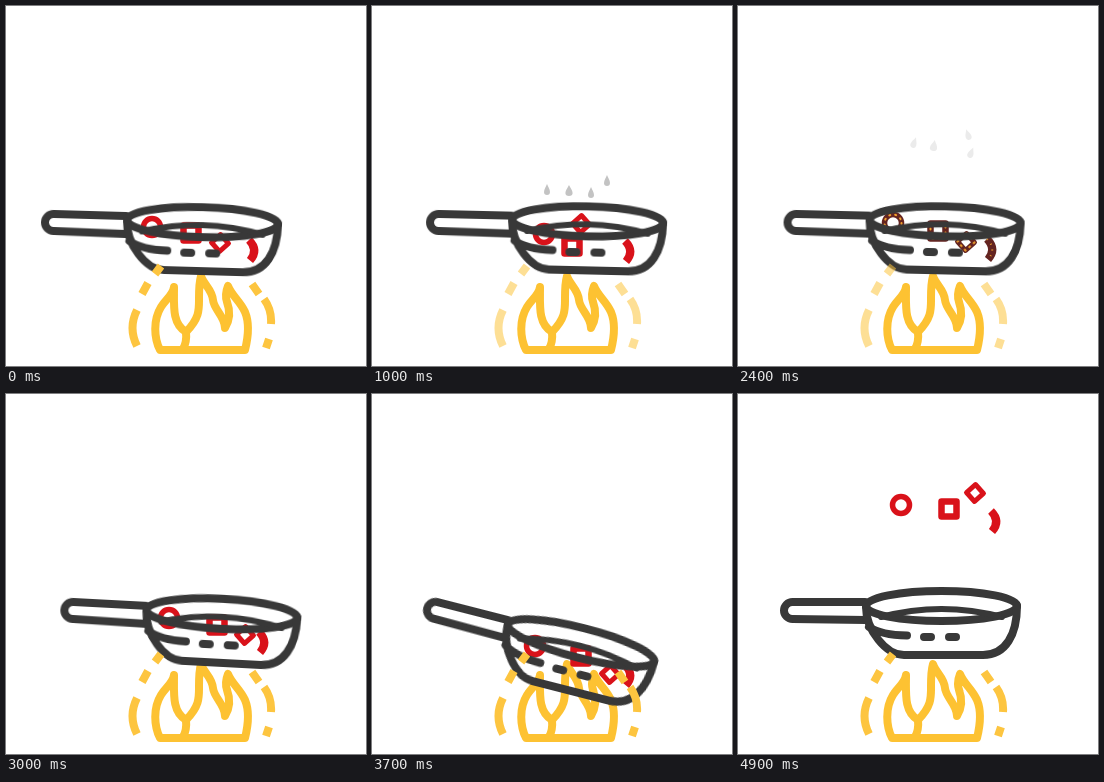
Animation, 360 px wide and 360 px high, one loop 5 s. Source, as an HTML page without scripts:

```html
<!DOCTYPE html>
<html lang="en">
<head>
<meta charset="utf-8">
<title>Frying pan</title>
<style>
html, body { margin: 0; width: 100%; height: 100%; overflow: hidden; background: #fff; }
svg { display: block; width: 100%; height: 100%; fill: none; stroke-linecap: round; stroke-linejoin: round; }

.fire { stroke: #fdc232; stroke-width: 8; }
.glow { stroke: #fdc540; stroke-width: 8; stroke-linecap: butt; animation: glow 5s linear infinite; }
.pan {
  stroke: #383838; stroke-width: 8; transform-origin: 55px 216.5px;
  animation: slide 5s ease-in-out infinite, tilt 5s cubic-bezier(.37, 0, .63, 1) infinite;
}
.food > g { stroke: #d9121a; animation: toss 5s ease-in-out infinite, sear 5s linear infinite; }
.char { stroke: #f2a02c; stroke-width: 2; stroke-dasharray: 1 5; animation: char 5s linear infinite; }
.steam { fill: #bdbdbd; animation: fade 5s linear infinite; }
.steam use { animation: rise 5s linear infinite; }

@keyframes glow { 0%, 60%, 100% { opacity: 1; } 16%, 50% { opacity: .55; } }
@keyframes slide {
  0%, 37% { translate: -7px 0; }
  18%, 58% { translate: 12.5px 0; }
  74% { translate: 9px 0; animation-timing-function: linear; }
  86% { translate: 6px 0; animation-timing-function: linear; }
  98%, 100% { translate: 0 0; }
}
@keyframes tilt {
  0% { rotate: 1.6deg; }
  20%, 56% { rotate: 1.3deg; }
  73% { rotate: 14.6deg; }
  87% { rotate: -6.2deg; }
  98%, 100% { rotate: 0deg; }
}
@keyframes toss {
  0%, 37% { translate: var(--rest); }
  20% { translate: var(--hop); }
  48% { translate: var(--back); }
  60% { translate: var(--front); }
  74% { translate: var(--dip); }
  84% { translate: var(--lift); animation-timing-function: linear; }
  86% { translate: var(--fly); animation-timing-function: cubic-bezier(.3, .4, .6, 1); }
  93.6% { translate: var(--top); animation-timing-function: ease-in; }
  98%, 100% { translate: var(--fall); }
}
@keyframes sear { 0%, 42%, 54%, 100% { stroke: #d9121a; } 47%, 49% { stroke: #642420; } }
@keyframes char { 0%, 43%, 53%, 100% { opacity: 0; } 47%, 49% { opacity: 1; } }
@keyframes fade { 0%, 5% { opacity: 0; } 13% { opacity: 1; } 20% { opacity: .9; } 48% { opacity: .3; } 54%, 100% { opacity: 0; } }
@keyframes rise {
  0% { translate: 0 33px; rotate: 0deg; }
  20% { translate: 0 0; rotate: 0deg; }
  48% { translate: var(--drift); rotate: var(--lean); }
  54%, 100% { translate: var(--drift); rotate: var(--lean); }
}

.ring {
  --rest: 146px 221px; --hop: 172px 228px; --back: 155px 217px; --front: 163px 224px; --dip: 163px 252px;
  --lift: 163px 196px; --fly: 163px 174px; --top: 163px 101px; --fall: 163px 111px;
}
.cube {
  --rest: 185px 227px; --hop: 200px 240px; --back: 200px 225px; --front: 211px 231px; --dip: 209px 262px;
  --lift: 211px 204px; --fly: 211px 181px; --top: 211px 105px; --fall: 211px 115px;
}
.gem {
  --rest: 214px 237px; --hop: 209px 218px; --back: 228px 236px; --front: 239px 241px; --dip: 238px 280px;
  --lift: 237px 205px; --fly: 237px 179px; --top: 237px 88px; --fall: 237px 99px;
}
.slice {
  --rest: 247px 244px; --hop: 257px 245px; --back: 253px 243px; --front: 257px 248px; --dip: 257px 281px;
  --lift: 257px 218px; --fly: 257px 196px; --top: 257px 117px; --fall: 257px 127px;
}
</style>
</head>
<body>
<svg viewBox="0 0 360 360">
  <defs>
    <path id="drop" d="M0-6C1-3 3-1 3 2A3 3 0 0 1-3 2C-3-1-1-3 0-6Z"/>
    <circle id="ring" r="8.5"/>
    <rect id="cube" x="-7.5" y="-7.5" width="15" height="15"/>
    <rect id="gem" x="-6" y="-6" width="12" height="12" transform="rotate(48)"/>
    <path id="slice" d="M-4-10Q6 0-3 10.5"/>
  </defs>

  <g class="steam">
    <g transform="translate(175 184)"><use href="#drop" style="--drift: 1px -47px; --lean: 20deg"/></g>
    <g transform="translate(197 185) scale(1.2 1)"><use href="#drop" style="--drift: -1px -45px; --lean: 8deg"/></g>
    <g transform="translate(219 187)"><use href="#drop" style="--drift: 14px -40px; --lean: 22deg"/></g>
    <g transform="translate(235 175)"><use href="#drop" style="--drift: -5px -46px; --lean: -18deg"/></g>
  </g>

  <g class="fire">
    <path d="M154 344C148 332 147 314 155 301C160 293 167 289 168 281C168 300 166 318 180 326C194 312 193 303 193 292C193 284 193 277 195 270C198 279 206 283 207 294C208 304 219 310 219 322C225 312 224 304 221 296C219 290 220 285 222 280C226 290 234 295 239 306C244 318 242 332 239 344Z"/>
    <path d="M180 326Q181 336 177 343"/>
  </g>

  <g class="food">
    <g class="ring" stroke-width="5.5"><use href="#ring"/><use class="char" href="#ring"/></g>
    <g class="cube" stroke-width="6.5"><use href="#cube"/><use class="char" href="#cube"/></g>
    <g class="gem" stroke-width="5"><use href="#gem"/><use class="char" href="#gem"/></g>
    <g class="slice" stroke-width="8" stroke-linecap="butt"><use href="#slice"/><use class="char" href="#slice"/></g>
  </g>

  <g class="pan">
    <path d="M127 208H54.5A8.5 8.5 0 0 0 54.5 225L128 226"/>
    <ellipse cx="203.500" cy="212" rx="75.500" ry="15"/>
    <path d="M128 213C128 236 148 261 166 261H245C268 261 279 240 279 212"/>
    <path d="M143 223Q203.500 207 264 223" stroke-width="6"/>
    <path d="M131 233Q143 241 169 241.500M186 243H193M211 243H218"/>
  </g>

  <path class="glow" d="M131 340Q122 322 131 304M136 288L142 277M149 268L155 260M246 278L253 288M258 293Q266 304 265 318M263 333L260 342"/>
</svg>
</body>
</html>
```
